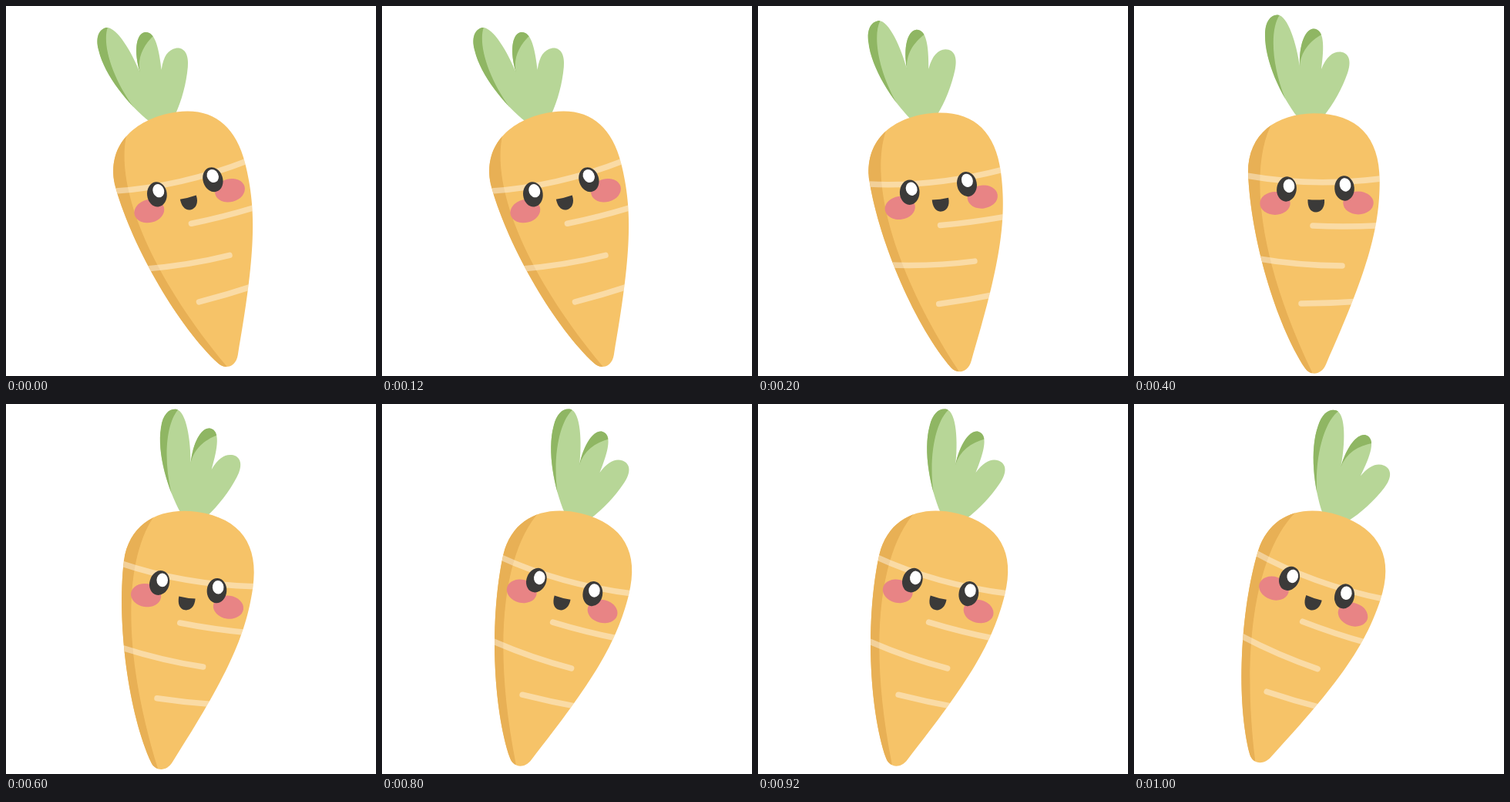
These frames come from a looping animation (480x480 px, 1200 ms). An HTML page:

```html
<!DOCTYPE html>
<html lang="en">
<head>
<meta charset="utf-8">
<title>Swaying carrot</title>
<style>
  html, body { margin: 0; width: 100%; height: 100%; overflow: hidden; background: #fff; }
  svg { display: block; width: 100%; height: 100%; }
</style>
</head>
<body>
<svg viewBox="0 0 480 480">
  <defs>
    <path id="root" d="M233 139.2 C290 139 318.5 170 318.7 226 C319 290 302 346 249 465
      C243 479 229 480 222 470 C184 412 151 300 148 216 C148 165 185 140 233 139.2Z"/>
    <path id="leaves" d="M212 144 C190 115 170 72 170 38 C170 20 177 12 186 11.5
      C200 12 211 50 215 78 C214 50 222 30 233 29.5 C247 30 247 52 243 82
      C250 65 258 59 268 59.5 C280 61 282 73 277 87 C270 107 259 127 246 143Z"/>
    <clipPath id="inRoot"><use href="#root"/></clipPath>
    <clipPath id="inLeaves"><use href="#leaves"/></clipPath>
  </defs>
  <g id="carrot">
    <use href="#leaves" fill="#b7d697"/>
    <g clip-path="url(#inLeaves)" fill="#8fb663">
      <path d="M196 120 C178 75 176 28 190 10 L160 0 V120Z"/>
      <path d="M215 79 C216 60 227 46 245 36 L240 20 L212 25Z"/>
    </g>
    <use href="#root" fill="#f6c368"/>
    <g clip-path="url(#inRoot)">
      <path d="M180 150 C150 205 157 320 231 475 L231 485 H130 V130Z" fill="#e8b055"/>
      <g fill="none" stroke="#fff" stroke-opacity=".4" stroke-width="7.5" stroke-linecap="round">
        <path d="M143 219.5 Q230 235.5 324 223.5"/>
        <path d="M232 285 Q275 287 322 284.5"/>
        <path d="M156 327 Q215 337 270 337"/>
        <path d="M217 386 Q255 386 294 383"/>
      </g>
    </g>
    <g fill="#e88485">
      <ellipse cx="183" cy="256" rx="19.7" ry="15"/>
      <ellipse cx="291" cy="255.5" rx="19.7" ry="15"/>
    </g>
    <g fill="#3b3a39">
      <ellipse cx="198" cy="237.5" rx="12.8" ry="16.2" transform="rotate(8 198 237.5)"/>
      <ellipse cx="273" cy="236.5" rx="12.8" ry="16.2" transform="rotate(-4 273 236.5)"/>
      <path d="M225.5 251 Q236 252 247 251 C248 262 242 267.5 236 267.5 C229 267.5 225 261 225.5 251Z"/>
    </g>
    <g fill="#fff">
      <ellipse cx="201" cy="233.4" rx="7.3" ry="8.8" transform="rotate(-8 201 233.4)"/>
      <ellipse cx="274" cy="231.9" rx="7.3" ry="8.8" transform="rotate(-13 274 231.9)"/>
    </g>
  </g>
</svg>
<script>
  const STEP = 200;
  const carrot = document.getElementById("carrot");

  // Each pose: tilt in degrees, then where the carrot's middle sits.
  const poses = [
    [-14.1, 245.5, 295.8],
    [-7.4, 240, 298.5],
    [0, 233.6, 299.4],
    [8.5, 225.2, 298.5],
    [14.3, 219.6, 297.4],
    [18.6, 215.6, 296.4]
  ];

  function draw(time) {
    const [tilt, x, y] = poses[Math.floor(time / STEP) % poses.length];
    carrot.setAttribute("transform",
      `translate(${x} ${y}) rotate(${tilt}) translate(-233.6 -299.4)`);
  }

  const start = performance.now();
  function tick() {
    draw(performance.now() - start);
    requestAnimationFrame(tick);
  }
  tick();
</script>
</body>
</html>
```
